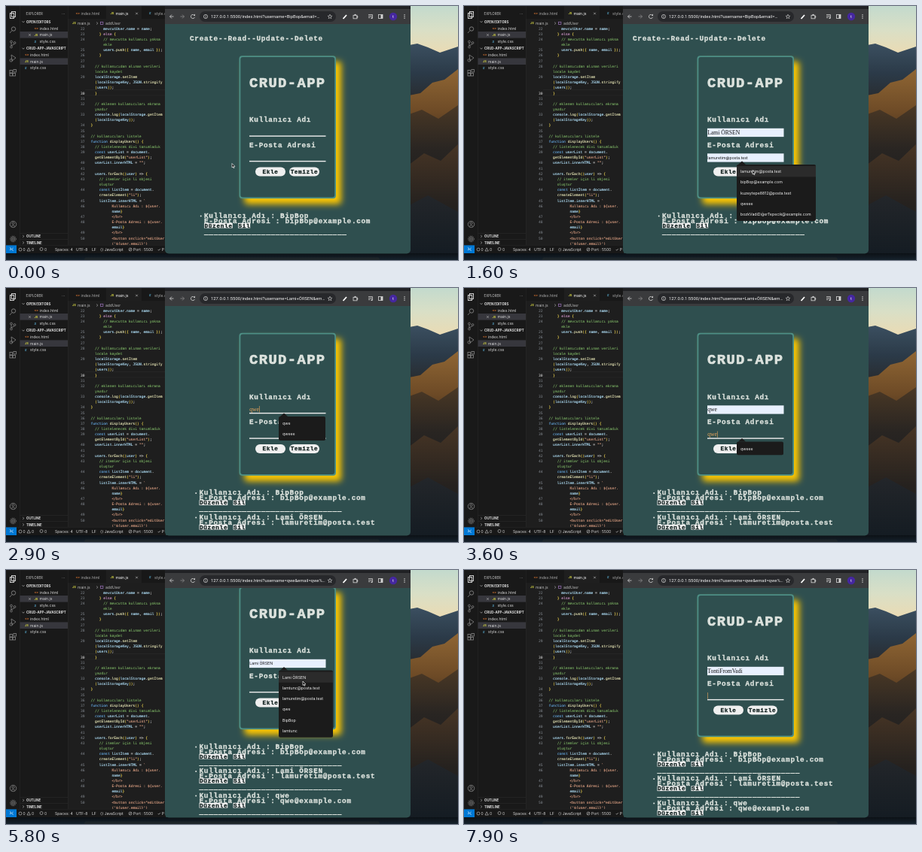
An HTML page with a canvas that plays this animation: 600x338 px, repeating every 8000 ms.

```html
<!DOCTYPE html>
<html lang="tr">
<head>
<meta charset="utf-8">
<title>CRUD-APP</title>
<style>
html, body { margin: 0; width: 100%; height: 100%; overflow: hidden; background: #111; }
canvas { display: block; width: 600px; height: 338px; }
</style>
</head>
<body>
<canvas id="stage"></canvas>
<script>
const canvas = document.getElementById('stage');
const c = canvas.getContext('2d');
const K = Math.max(1, window.devicePixelRatio || 1);
canvas.width = 600 * K;
canvas.height = 338 * K;

const UI = 'Inter, sans-serif';
const ROBOTO = 'Roboto, sans-serif';
const CODE = '"DejaVu Sans Mono", monospace';
const PIXEL = '"Liberation Mono", monospace';
const SERIF = '"Liberation Serif", serif';
const PAGE = '#2f4f4f', INK = '#dde3de', ORANGE = '#e9a65c';
const LOOP = 8000;

// ---------- drawing helpers ----------
function text(s, x, y, font, color, align = 'left', spacing = 0, bold = 0) {
  c.font = font;
  c.fillStyle = color;
  c.textAlign = align;
  c.textBaseline = 'alphabetic';
  c.letterSpacing = spacing + 'px';
  c.fillText(s, x, y);
  if (bold) {
    c.strokeStyle = color;
    c.lineWidth = bold;
    c.strokeText(s, x, y);
  }
  c.letterSpacing = '0px';
}
const ui = (s, x, y, size = 5.1, color = '#ccc', weight = 400) =>
  text(s, x, y + size * 0.36, `${weight} ${size}px ${UI}`, color);
const pixel = (s, x, y, size = 9.3, color = INK, gap = 0.74) =>
  text(s, x, y + size * 0.32, `bold ${size}px ${PIXEL}`, color, 'left', gap, size * 0.035);

function rect(x, y, w, h, color) {
  c.fillStyle = color;
  c.fillRect(x, y, w, h);
}
function round(x, y, w, h, r, color) {
  c.beginPath();
  c.roundRect(x, y, w, h, r);
  c.fillStyle = color;
  c.fill();
}
function circle(x, y, r, color, fill) {
  c.beginPath();
  c.arc(x, y, r, 0, 7);
  if (fill) { c.fillStyle = color; c.fill(); }
  else { c.strokeStyle = color; c.stroke(); }
}
function line(points, color, width = 0.8) {
  c.beginPath();
  points.forEach(([x, y], i) => i ? c.lineTo(x, y) : c.moveTo(x, y));
  c.strokeStyle = color;
  c.lineWidth = width;
  c.stroke();
}
function shape(points, color) {
  c.beginPath();
  points.forEach(([x, y]) => c.lineTo(x, y));
  c.closePath();
  c.fillStyle = color;
  c.fill();
}
function fade(y0, y1, ...colors) {
  const g = c.createLinearGradient(0, y0, 0, y1);
  colors.forEach((v, i) => g.addColorStop(i / (colors.length - 1), v));
  return g;
}

// ---------- desktop ----------
function desktop() {
  rect(530, 0, 70, 338, fade(0, 62, '#c3dacd', '#d9dfc6', '#eadbb4'));
  shape([[530, 53], [546, 50], [560, 55], [576, 62], [588, 58], [600, 54], [600, 140], [530, 140]],
    fade(50, 130, '#3b4f60', '#2b3a48', '#28292b'));
  shape([[530, 120], [550, 116], [566, 102], [582, 98], [600, 84], [600, 200], [530, 200]],
    fade(88, 195, '#8d6433', '#6d4a26', '#2b241e'));
  shape([[530, 146], [552, 138], [574, 150], [600, 132], [600, 260], [530, 260]],
    fade(132, 250, '#4a3825', '#292522', '#1c1e20'));
  shape([[530, 215], [555, 196], [577, 206], [600, 184], [600, 338], [530, 338]],
    fade(185, 338, '#473525', '#26221f', '#141a1f'));
  shape([[530, 268], [560, 252], [600, 274], [600, 338], [530, 338]],
    fade(252, 338, '#23262a', '#131b22'));
  rect(0, 329, 600, 9, fade(329, 338, '#0c1116', '#16222c'));
  round(104, 334.5, 392, 10, 3, '#1d2529');
}

// ---------- editor ----------
const code = `      mevcutUser.name = name;
    } else {
      // mevcutta kullanıcı yoksa
+      #ekle
      users.push({ name, email });
    }

  // kullanıcıdan alınan verileri
+  #locale kaydet
  localStorage.setItem
+  (localStorageKey, JSON.stringify
+  (users));
  }

  // eklenen kullanıcıları ekrana
+  #yazdır
  console.log(localStorage.getItem
+  (localStorageKey));
}

// kullanıcıları listele
function displayUsers() {
  // listelenecek divi tanımladık
  const userList = document.
+  getElementById("userList");
  userList.innerHTML = "";

  users.forEach((user) => {
    // itemler için li objesi
+    #oluştur
    const listItem = document.
+    createElement("li");
    listItem.innerHTML = \`
          $Kullanıcı Adı : \${user.
+          name}
          $</br>
          $E-Posta Adresi : \${user.
+          email}
          $</br>
          $<button onclick="editUser
+          $('\${user.email}')`.split('\n');

const TOKEN = /\/\/.*|"[^"]*"|\w+|[^\w\s"]/g;
function tokenColor(tok, next) {
  if (tok.startsWith('//')) return '#78ad62';
  if (/^["`]/.test(tok)) return '#dda083';
  if (tok === 'else') return '#d095ca';
  if (/^(const|function)$/.test(tok)) return '#65a9e2';
  if (/^[(){}\[\]]$/.test(tok)) return '#f0d650';
  if (/^(setItem|getItem|stringify)$/.test(tok) || next === '(') return '#ecebba';
  return /^\w/.test(tok) ? '#b4e5ff' : '#e6e6e6';
}

function codeLines() {
  const font = `4.65px ${CODE}`;
  const put = (s, x, y, color) => text(s, x, y, font, color, 'left', 0, 0.12);
  let num = 21;
  code.forEach((row, i) => {
    const y = 31.7 + i * 7.15;
    const more = row[0] === '+';
    if (more) row = row.slice(1);
    else {
      num++;
      text(num, 104.5, y, font, num === 30 ? '#eee' : '#858b92', 'right');
    }
    const body = row.trimStart();
    const x = 112.5 + (row.length - body.length) * 2.8;
    if (body[0] === '#') return put(body.slice(1), x, y, '#78ad62');
    if (body[0] === '$') return put(body.slice(1), x, y, '#dda083');
    for (const m of body.matchAll(TOKEN))
      put(m[0], x + m.index * 2.8, y, tokenColor(m[0], body[m.index + m[0].length]));
  });
}

const fileKinds = { 'index.html': ['<>', '#e37933'], 'main.js': ['JS', '#cbcb41'], 'style.css': ['#', '#519aba'] };
function file(name, x, y, color = '#d8d8d8') {
  const [mark, tint] = fileKinds[name];
  ui(mark, x - 7, y, 4, tint, 700);
  ui(name, x, y, 5.1, color);
}
const cross = (x, y) => {
  line([[x - 1.3, y - 1.3], [x + 1.3, y + 1.3]], '#ccc', 0.6);
  line([[x + 1.3, y - 1.3], [x - 1.3, y + 1.3]], '#ccc', 0.6);
};
const chevron = (x, y, open) => line(open
  ? [[x - 1.5, y - 0.8], [x, y + 0.8], [x + 1.5, y - 0.8]]
  : [[x - 0.8, y - 1.5], [x + 0.8, y], [x - 0.8, y + 1.5]], '#ccc', 0.6);

function activityBar() {
  const g = '#858585';
  c.lineWidth = 0.9;
  c.strokeStyle = '#e5e5e5';
  c.strokeRect(5.5, 9.5, 5, 7);
  c.strokeRect(7.5, 7.5, 5, 7);
  circle(10, 30.5, 2.7, g);
  line([[8, 32.6], [5, 36]], g);
  circle(7, 47.5, 1.4, g);
  circle(7, 54.5, 1.4, g);
  circle(11.5, 49, 1.4, g);
  line([[7, 49], [7, 53], [11.5, 50.4]], g);
  line([[7, 65], [13, 69], [8, 73], [7, 65]], g);
  circle(6.8, 72.3, 1.8, g);
  c.strokeStyle = g;
  for (const [x, y] of [[5, 85.5], [5, 89.5], [9, 89.5], [10, 84.5]]) c.strokeRect(x, y, 3.5, 3.5);
  circle(9.5, 290.5, 4.2, g);
  circle(9.5, 289.2, 1.5, g);
  line([[6.7, 293.5], [9.5, 291.8], [12.3, 293.5]], g);
  c.setLineDash([1.3, 1]);
  circle(9.5, 310, 3.9, g);
  c.setLineDash([]);
  circle(9.5, 310, 2.6, g);
  circle(9.5, 310, 1, g);
}

function editor() {
  rect(0, 0, 212, 329, '#1e1e1e');
  rect(0, 0, 82, 318, '#191919');
  rect(18, 0, 0.5, 318, '#2b2b2b');
  rect(82, 0, 0.5, 318, '#2b2b2b');
  rect(82.5, 0, 130, 17, '#181818');
  rect(133, 0, 47, 17, '#1f1f1f');
  activityBar();

  ui('EXPLORER', 26.5, 10, 4.4, '#ccc');
  ui('···', 74, 10, 5);
  rect(18.5, 34, 63.5, 8.6, '#37373d');
  rect(18.5, 69.4, 63.5, 8.6, '#37373d');
  const heads = { 'OPEN EDITORS': 21, 'CRUD-APP-JAVASCRIPT': 56.5, OUTLINE: 306.5, TIMELINE: 315 };
  for (const [name, y] of Object.entries(heads)) {
    if (y > 300) rect(18.5, y - 4.5, 63.5, 0.4, '#333');
    chevron(23, y, y < 100);
    ui(name, 27, y, 4.4, '#e0e0e0', 700);
  }
  Object.keys(fileKinds).forEach((name, i) => {
    file(name, 44.5, 30 + i * 8.6);
    file(name, 32, 65 + i * 8.7);
  });
  cross(31.5, 38.5);

  file('index.html', 99.5, 10, '#aaa');
  file('main.js', 145.5, 10, '#fff');
  cross(173.5, 10);
  file('style.css', 197, 10, '#aaa');
  ui('JS', 88, 23, 4, '#cbcb41', 700);
  ui('main.js', 95, 23, 5, '#bbb');
  chevron(121, 23);
  c.strokeStyle = '#b180d7';
  c.lineWidth = 0.6;
  c.strokeRect(125.5, 21.2, 3.4, 3.4);
  ui('addUser', 132, 23, 5, '#bbb');

  rect(105, 111.6, 107, 0.4, '#303030');
  rect(105, 118.8, 107, 0.4, '#303030');
  codeLines();

  rect(0, 318, 212, 11, '#181818');
  rect(0, 318, 212, 0.4, '#2b2b2b');
  rect(0, 318.4, 14, 10.6, '#0078d4');
  line([[5, 321.5], [7, 323.3], [5, 325]], '#fff', 0.7);
  line([[9.5, 322], [7.5, 323.8], [9.5, 325.8]], '#fff', 0.7);
  c.lineWidth = 0.6;
  circle(19, 324, 2, '#ccc');
  ui('0', 22.5, 324, 5);
  line([[28, 326], [30.2, 321.8], [32.4, 326], [28, 326]], '#ccc', 0.6);
  ui('0', 34, 324, 5);
  circle(47, 323.5, 2, '#ccc');
  ui('0', 51, 324, 5);
  const status = { 'Spaces: 4': 65, 'UTF-8': 93, LF: 114, '{} JavaScript': 125, 'Port : 5500': 169, '✓ P': 201 };
  for (const [s, x] of Object.entries(status)) ui(s, x, 324, 5, '#ddd');
  circle(165, 324, 2, '#ccc');
  line([[163.6, 325.4], [166.4, 322.6]], '#ccc', 0.6);
}

// ---------- browser ----------
function toolbar(query) {
  const g = '#d4d4d4';
  rect(211, 0, 326, 5, '#202124');
  rect(211, 4, 326, 20, '#3a3b3d');
  line([[222.5, 14], [217.5, 14], [220, 11.5]], g);
  line([[217.5, 14], [220, 16.5]], g);
  line([[231.5, 14], [236.5, 14], [234, 11.5]], '#8a8a8a');
  line([[236.5, 14], [234, 16.5]], '#8a8a8a');
  c.beginPath();
  c.arc(248, 14, 2.6, 0.3, 5.5);
  c.strokeStyle = g;
  c.stroke();
  shape([[248.8, 13], [251, 13], [251, 10.6]], g);
  round(257, 7, 181, 14, 7, '#27282b');
  c.lineWidth = 0.7;
  circle(265, 14, 2.6, g);
  rect(264.7, 13.4, 0.7, 2.2, g);
  rect(264.7, 12.2, 0.7, 0.7, g);
  text('127.0.0.1:5500/index.html?username=' + query, 272, 16.1, `5.87px ${ROBOTO}`, '#f4f4f4');

  const star = [...Array(11)].map((_, i) => {
    const a = i * Math.PI / 5 - Math.PI / 2, r = i % 2 ? 1.3 : 3;
    return [430 + r * Math.cos(a), 14.2 + r * Math.sin(a)];
  });
  line(star, g, 0.6);
  line([[447.5, 17], [452, 12]], '#fff', 1.8);
  c.strokeStyle = g;
  c.lineWidth = 0.8;
  c.strokeRect(461, 12.3, 5, 4.5);
  circle(463.5, 11.8, 1.1, g, true);
  circle(466.3, 14.5, 1.1, g, true);
  for (let i = 0; i < 3; i++) rect(481, 11.2 + i * 2, i < 2 ? 5 : 2.5, 0.8, g);
  rect(486.2, 11.2, 0.7, 4.6, g);
  circle(485.6, 16, 1.1, g, true);
  c.strokeStyle = g;
  c.lineWidth = 0.8;
  c.strokeRect(494.5, 11.5, 5.5, 5);
  rect(497.5, 11.5, 2.5, 5, g);
  circle(514, 14, 5.2, '#4527a0', true);
  text('t', 514, 15.9, `5.5px ${ROBOTO}`, '#fff', 'center');
  for (let i = -1; i < 2; i++) circle(529, 14 + i * 2.2, 0.7, g, true);
}

const people = [
  ['BipBop', 'bipBop@example.com'],
  ['Lami ÖRSEN', 'lamuretim@posta.test'],
  ['qwe', 'qwe@example.com']
];
const queries = ['BipBop&email=…', 'Lami+ÖRSEN&em…', 'qwe&email=qwe%…'];

const names = ['Lami ÖRSEN', 'lamtunc@posta.test', 'lamuretim@posta.test', 'BipBop', 'lamtunc', 'qwe'];
const namesLate = [...names.slice(0, 3), 'qwe', 'BipBop', 'lamtunc'];
const mails = ['lamuretim@posta.test', 'bipBop@example.com', 'kuzeytepe8812@posta.test', 'qweee',
  'bozkVadiDiğerTepecik@example.com'];

function field(y, value, look, focused) {
  if (look === 'typed') {
    rect(323, y - 0.6, 101.5, 1.4, '#eee');
    text(value, 323.3, y - 2.6, `7.6px ${SERIF}`, ORANGE);
    if (focused) rect(323.3 + c.measureText(value).width, y - 9.5, 0.6, 8.5, ORANGE);
    return;
  }
  rect(323, y - 10.2, 101.5, 11.3, '#e8f0fe');
  const font = look === 'fill' ? `7.6px ${SERIF}` : `5.2px ${UI}`;
  text(value, 323.3, y - (look === 'fill' ? 2.4 : 2.7), font, '#111');
}

function button(s, x, y) {
  round(x, y - 6, 40, 12, 6, '#efefef');
  const w = s.length * 5.25;
  pixel(s, x + 20 - w / 2, y, 7.7, '#10201f', 0.63);
}

function card(y, s) {
  c.save();
  c.shadowColor = '#ffc800';
  c.shadowOffsetX = 7 * K;
  c.shadowOffsetY = 7.5 * K;
  c.shadowBlur = 9 * K;
  round(309.5, y - 0.7, 128.5, 190, 4, '#4d8f85');
  c.restore();
  round(311.3, y + 1.1, 124.9, 186.4, 3, PAGE);
  pixel('CRUD-APP', 323, y + 34.8, 18.8, INK, 1.42);
  pixel('Kullanıcı Adı', 323, y + 84.5);
  pixel('E-Posta Adresi', 323, y + 117.8);
  field(y + 106, s.name, s.nameLook, s.focus === 'name');
  field(y + 139.5, s.mail, s.mailLook, s.focus === 'mail');
  button('Ekle', 331, y + 153.5);
  button('Temizle', 376, y + 153.5);
}

function chip(s, x, y) {
  const w = s.length * 5.4;
  rect(x, y - 3.4, w, 6.8, '#efefef');
  pixel(s, x + 0.4, y, 7.7, '#10201f', 0.72);
}

function list(y, count) {
  const x = count > 1 ? 256.5 : 263;
  people.slice(0, count).forEach(([name, mail], i) => {
    const top = y + 212 + i * 32.5;
    circle(x - 4.3, top + 0.6, 1, INK, true);
    pixel('Kullanıcı Adı : ' + name, x, top);
    pixel('E-Posta Adresi : ' + mail, x, top + 6.6);
    chip('Düzenle', x, top + 13.2);
    chip('Sil', x + 45, top + 13.2);
    pixel('_'.repeat(30), x, top + 22);
  });
}

function menu(y, items, width, hover) {
  shape([[364, y], [369, y - 4.5], [374, y]], '#1b1b1b');
  round(362, y, width, items.length * 14.3 + 3.5, 2, '#1b1b1b');
  if (hover) rect(362, y + 2, width, 14.3, '#2b2b2b');
  items.forEach((s, i) => ui(s, 367, y + 9.2 + i * 14.3, 5.25, '#f2f2f2'));
}

function browser(t, s, scroll) {
  c.save();
  c.beginPath();
  c.roundRect(211, -6, 326, 335.5, 5);
  c.clip();
  rect(211, 0, 326, 330, PAGE);
  const y = (s.count > 1 ? 60.5 : 67) - scroll;
  if (s.count === 1) pixel('Create--Read--Update--Delete', 244 - t * 0.0125, 43);
  card(y, s);
  list(y, s.count);
  if (t >= 4900 && t < 5500 || t >= 6400 && t < 7100)
    round(533, 24 + scroll * 0.9, 2.6, 271, 1.3, 'rgba(200,205,205,.65)');
  const row = s.focus === 'mail' ? 144 : 110.5;
  if (s.menu) menu(y + row, s.menu, s.width, s.hover);
  toolbar(queries[s.count - 1]);
  c.restore();
}

// ---------- timeline ----------
const blank = { name: '', nameLook: 'typed', mail: '', mailLook: 'typed', focus: '', menu: null };
const closed = { menu: null, hover: false };
const pick = { menu: names, width: 72, hover: false };
const steps = [
  [0, { ...blank, count: 1 }],
  [500, { focus: 'name', ...pick }],
  [700, { name: 'Lami ÖRSEN', nameLook: 'preview', hover: true }],
  [900, { nameLook: 'fill', ...closed }],
  [1200, { focus: 'mail', menu: mails, width: 105 }],
  [1500, { mail: mails[0], mailLook: 'preview', hover: true }],
  [1700, { mailLook: 'fill', ...closed }],
  [2000, { ...blank, ...closed, count: 2 }],
  [2200, { focus: 'name', ...pick }],
  ...typing('name', 'qwe', 2600, 100),
  [2700, { menu: ['qwe', 'qweee'], width: 62 }],
  [3000, { nameLook: 'fill', ...closed }],
  [3200, { focus: 'mail' }],
  ...typing('mail', 'qwe', 3400, 100),
  [3400, { menu: ['qweee'], width: 62 }],
  [3800, { menu: null }],
  ...typing('mail', 'qwe@example.com', 3700, 60, 3),
  [4700, { ...blank, count: 3 }],
  [5400, { focus: 'name', ...pick, menu: namesLate }],
  [5600, { name: 'Lami ÖRSEN', nameLook: 'preview', hover: true }],
  [6200, { name: '', nameLook: 'typed', ...closed }],
  [6600, { name: 'a' }],
  [7000, { name: '' }],
  ...typing('name', 'Ton', 7100, 100),
  [7500, { name: 'TontiFromVadi', nameLook: 'fill' }],
  [7700, { focus: 'mail' }]
].sort((a, b) => a[0] - b[0]);
function typing(key, word, start, gap, from = 0) {
  return [...word].slice(from).map((_, i) => [start + i * gap, { [key]: word.slice(0, from + i + 1) }]);
}

const ease = p => p * p * (3 - 2 * p);
const tween = (t, a, b) => ease(Math.min(1, Math.max(0, (t - a) / (b - a))));

const path = [
  [0, 300, 209.5], [200, 300, 209.5], [500, 370, 168], [700, 384, 185], [900, 384, 185], [1200, 372, 203],
  [1500, 383, 218.5], [1700, 383, 218.5], [1900, 352, 221], [2000, 352, 221], [2200, 371, 160.5],
  [2500, 371, 160.5], [4700, 352, 215], [5000, 352, 200], [5400, 371, 124], [5700, 394, 148],
  [6100, 394, 148], [6500, 462.5, 122], [8000, 462.5, 122]
];
function pointer(t) {
  if (t >= 2500 && t < 4700 || t >= 7100) return;
  const i = path.findIndex(p => p[0] > t);
  const [t0, x0, y0] = path[i - 1], [t1, x1, y1] = path[i];
  const p = tween(t, t0, t1);
  const x = x0 + (x1 - x0) * p, y = y0 + (y1 - y0) * p;
  if (t >= 2200 && t < 2500) {
    line([[x - 1.5, y - 3.2], [x + 1.5, y - 3.2]], '#ddd', 0.8);
    line([[x, y - 3.2], [x, y + 3.2]], '#ddd', 1);
    line([[x - 1.5, y + 3.2], [x + 1.5, y + 3.2]], '#ddd', 0.8);
    return;
  }
  const arrow = [[0, 0], [0, 5.4], [1.3, 4.3], [2.1, 6.2], [3, 5.8], [2.2, 4], [3.8, 3.9], [0, 0]]
    .map(([a, b]) => [x + a, y + b]);
  shape(arrow, '#000');
  line(arrow, '#fff', 0.7);
}

function draw(t) {
  c.setTransform(K, 0, 0, K, 0, 0);
  const s = {};
  for (const [at, patch] of steps) if (at <= t) Object.assign(s, patch);
  const scroll = 37.5 * tween(t, 4900, 5300) - 10 * tween(t, 6400, 6700);
  desktop();
  editor();
  browser(t, s, scroll);
  pointer(t);
}

let last = -1;
const start = performance.now();
function tick(now) {
  const t = Math.floor(Math.max(0, now - start) % LOOP / 100) * 100;
  if (t !== last) draw(last = t);
  requestAnimationFrame(tick);
}
draw(0);
requestAnimationFrame(tick);
</script>
</body>
</html>
```
